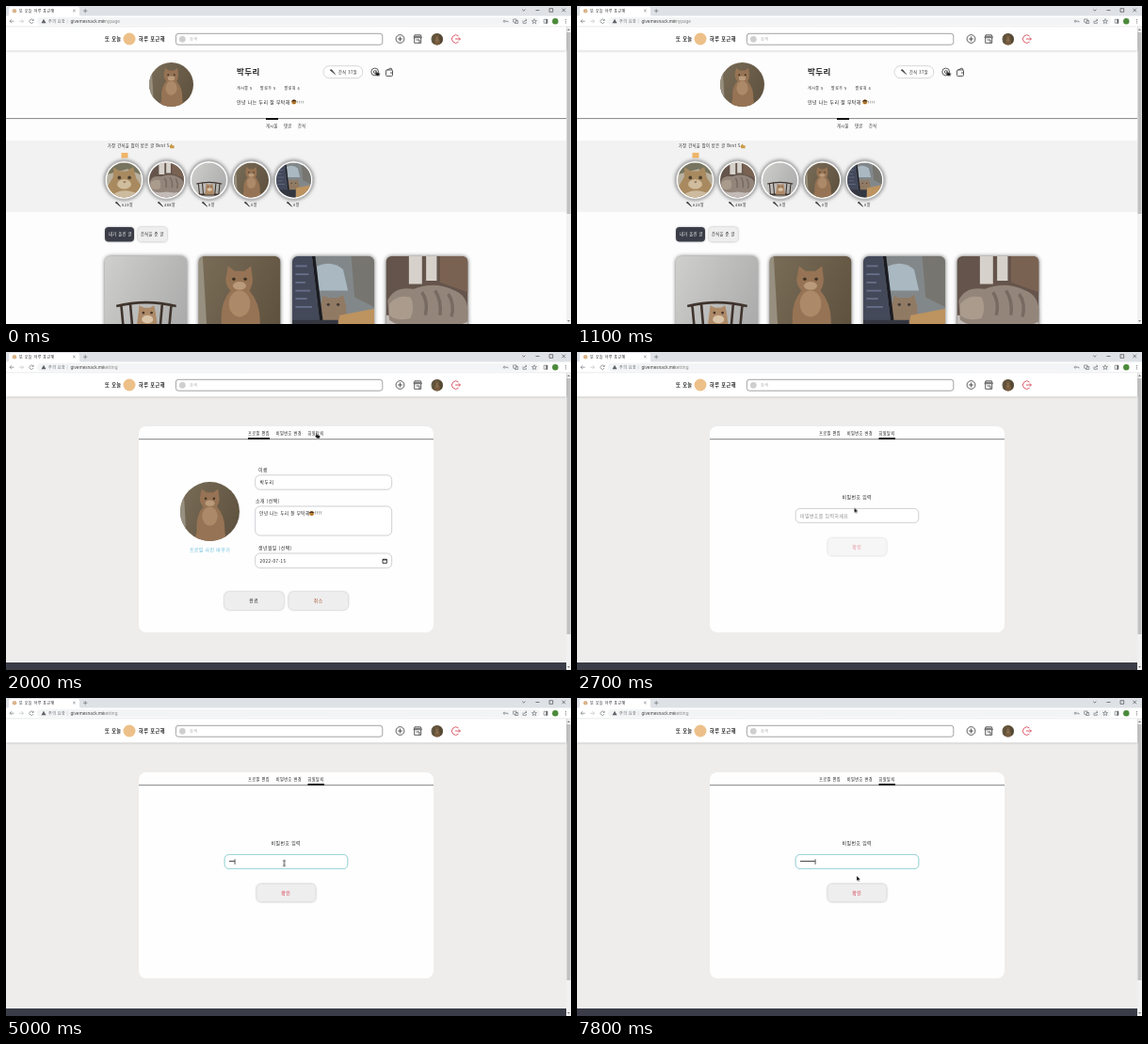
An HTML page for the animation above (8 s loop, 600 px wide and 338 px high).

```html
<!DOCTYPE html>
<html lang="ko">
<head>
<meta charset="utf-8">
<title>또 오늘 하루 포근해</title>
<style>
html, body { margin: 0; width: 100%; height: 100%; overflow: hidden; background: #fff; }
svg { display: block; width: 600px; height: 338px; }
text { font: 4.2px "Noto Sans CJK KR", "Noto Sans CJK", "Noto Sans", sans-serif; letter-spacing: .45px; fill: #222; }
.small { font-size: 4px; }
.large { font-size: 4.9px; }
.url { font: 4.6px "Noto Sans", sans-serif; letter-spacing: 0; fill: #444; }
.mid { text-anchor: middle; }
.bold { font-weight: 700; }
.name { font-size: 8.5px; }
.logo { font-size: 5.2px; }
.grey { fill: #8a8a8a; }
.line { fill: none; stroke: #333; stroke-width: .8; }
.thin { fill: none; stroke: #5f6368; stroke-width: .6; }
.field { fill: #fff; stroke: #c3c5ca; stroke-width: .8; }
.btn { fill: #efeeee; filter: drop-shadow(0 .8px .8px #0005); }
.dark { fill: #3a3d47; }
.card { filter: drop-shadow(0 .5px 2px #0009); }
.track { fill: #f1f1f1; }
.thumb { fill: #c1c1c1; }

/* 1% of the loop is 80 ms */
.profile, .settings, .edit, .leave, .hint, .focus, .ready, .cover, .caret, .blink,
.hand, .arrow, .beam { animation: 8s step-end infinite; }
.profile { animation-name: profile; }
.settings { animation-name: settings; }
.edit { animation-name: edit; }
.leave { animation-name: leave; }
.hint { animation-name: hint; }
.focus { animation-name: focus; }
.ready { animation-name: ready; }
.cover, .caret { animation-name: type; }
.blink { animation-name: blink; }
.hand { animation-name: hand; }
.arrow { animation-name: arrow; }
.beam { animation-name: beam; }
.cursor { animation: move 8s linear infinite; }

@keyframes profile { 0% { opacity: 1 } 15%, 100% { opacity: 0 } }
@keyframes settings { 0% { opacity: 0 } 15%, 100% { opacity: 1 } }
@keyframes edit { 0% { opacity: 1 } 27.5%, 100% { opacity: 0 } }
@keyframes leave { 0% { opacity: 0 } 27.5%, 100% { opacity: 1 } }
@keyframes hint { 0% { opacity: 1 } 50%, 100% { opacity: 0 } }
@keyframes focus { 0% { opacity: 0 } 47.5%, 100% { opacity: 1 } }
@keyframes ready { 0% { opacity: .55 } 50%, 100% { opacity: 1 } }
@keyframes type {
  0% { transform: none }
  50% { transform: translateX(2px) }
  55% { transform: translateX(4px) }
  58.75% { transform: translateX(6px) }
  63.75% { transform: translateX(8px) }
  66.25% { transform: translateX(10px) }
  73.75% { transform: translateX(12px) }
  76.25% { transform: translateX(14px) }
  81.25%, 100% { transform: translateX(16px) }
}
@keyframes blink {
  0% { opacity: 0 } 47.5% { opacity: 1 }
  72.5% { opacity: 0 } 73.75% { opacity: 1 }
  87.5% { opacity: 0 } 93.75%, 100% { opacity: 1 }
}
@keyframes hand { 0% { opacity: 1 } 15% { opacity: 0 } 25% { opacity: 1 } 28.75%, 100% { opacity: 0 } }
@keyframes arrow {
  0% { opacity: 0 } 15% { opacity: 1 } 25% { opacity: 0 } 28.75% { opacity: 1 }
  36.25% { opacity: 0 } 95%, 100% { opacity: 1 }
}
@keyframes beam { 0% { opacity: 0 } 36.25% { opacity: 1 } 95%, 100% { opacity: 0 } }
@keyframes move {
  0% { transform: translate(392.5px, 68.5px) }
  20% { transform: translate(392.5px, 68.5px); animation-timing-function: steps(5, start) }
  26.25% { transform: translate(329px, 86px) }
  27.5% { transform: translate(329px, 86px); animation-timing-function: steps(6, start) }
  35% { transform: translate(294.5px, 165.5px) }
  36.25% { transform: translate(294.5px, 165.5px); animation-timing-function: steps(4, start) }
  41.25% { transform: translate(295.5px, 175.5px) }
  91.25% { transform: translate(295.5px, 175.5px); animation-timing-function: steps(3, start) }
  95% { transform: translate(303px, 179px); animation-timing-function: steps(3, start) }
  98.75%, 100% { transform: translate(297px, 189px) }
}
</style>
</head>
<body>
<svg viewBox="0 0 600 338">
<defs>
  <linearGradient id="wall" x2="1" y2=".6"><stop stop-color="#cfcfcd"/><stop offset="1" stop-color="#abacab"/></linearGradient>
  <linearGradient id="floor" x2="1" y2=".6"><stop stop-color="#796d58"/><stop offset="1" stop-color="#5f523f"/></linearGradient>
  <clipPath id="round"><circle cx="50" cy="50" r="50"/></clipPath>
  <clipPath id="rect"><rect width="100" height="120" rx="7"/></clipPath>

  <!-- photos drawn on a 100 by 120 field -->
  <g id="face">
    <rect width="100" height="120" fill="#b9b1a0"/>
    <path d="M0 0H100V36L60 18 0 34Z" fill="#77755f"/>
    <path d="M18 42L20 14 38 24H58L76 12 84 44 100 68V120H0V72Z" fill="#a98a60"/>
    <ellipse cx="50" cy="62" rx="20" ry="14" fill="#d0bd9d"/>
    <path d="M16 92Q50 70 90 90V120H16Z" fill="#cdbb9f"/>
    <circle cx="36" cy="43" r="5" fill="#4c4030"/><circle cx="65" cy="43" r="5" fill="#4c4030"/>
    <path d="M46 54H56L51 59Z" fill="#7c5947"/>
  </g>
  <g id="nap">
    <rect width="100" height="120" fill="#64544b"/>
    <path d="M28 0H44V34H28ZM49 0H62V30H49Z" fill="#d6d2cb"/><path d="M66 0H100V44L66 32Z" fill="#7a6252"/>
    <path d="M0 72H100V120H0Z" fill="#c3bbb7"/>
    <path d="M2 54Q10 36 34 40 60 30 84 42 99 48 100 66V80Q80 90 50 84 20 90 4 78Z" fill="#93857a"/>
    <path d="M4 58Q14 46 30 50 36 62 30 76 14 80 4 72Z" fill="#aa9b8d"/>
    <path d="M44 44Q52 56 48 72M60 42Q68 54 66 72M76 46Q84 58 80 74" fill="none" stroke="#776a61" stroke-width="4"/>
  </g>
  <g id="chair">
    <rect width="100" height="120" fill="url(#wall)"/>
    <g fill="none" stroke="#40342d" stroke-width="3">
      <path d="M14 61Q50 52 87 61M20 60L23 92M31 58L34 92M70 58L67 92M81 60L78 92"/>
      <path d="M16 92H85" stroke-width="5"/>
    </g>
    <path d="M41 69L42 60 48 63H55L60 60 62 69 65 92H38Z" fill="#ad8a68"/>
    <ellipse cx="52" cy="77" rx="7" ry="5" fill="#d9c4a8"/>
    <circle cx="47" cy="69" r="1.6" fill="#473427"/><circle cx="57" cy="69" r="1.6" fill="#473427"/>
  </g>
  <g id="sit">
    <rect width="100" height="120" fill="url(#floor)"/>
    <path d="M0 0H5L12 120H0Z" fill="#978f7f"/>
    <path d="M33 28L36 12 44 18H56L64 12 66 28Q66 36 62 42 76 58 75 82L78 104H24L28 82Q26 56 39 42 33 36 33 28Z" fill="#967354"/>
    <ellipse cx="50" cy="58" rx="13" ry="16" fill="#ac8a69"/>
    <ellipse cx="50" cy="36" rx="8" ry="5" fill="#b99b7b"/>
    <circle cx="43" cy="28" r="2" fill="#3c3225"/><circle cx="57" cy="28" r="2" fill="#3c3225"/>
  </g>
  <g id="desk">
    <rect width="100" height="120" fill="#82888a"/>
    <path d="M30 12Q48 4 62 16L68 42H32Z" fill="#a9b8c1"/><path d="M72 0H100V62L76 50Z" fill="#77756f"/>
    <path d="M34 60L38 48 44 51H56L62 47 66 62V82H34Z" fill="#917a64"/>
    <circle cx="44" cy="59" r="1.8" fill="#413a35"/><circle cx="56" cy="59" r="1.8" fill="#413a35"/>
    <path d="M58 72L100 64V120H48Z" fill="#bd935f"/>
    <path d="M0 0H24L34 84H0Z" fill="#44495a"/><path d="M24 0H28L38 84H34Z" fill="#1b1c22"/>
    <path d="M4 12H18M4 22H20M4 32H16M4 42H22M4 52H18M4 62H24" stroke="#67718a" stroke-width="2"/>
    <path d="M0 78H56V120H0Z" fill="#343740"/>
  </g>

  <g id="carrot">
    <path d="M-2.4-1.8L-1-2.4 2.6 2.2Z" fill="#4a4542" stroke="#333" stroke-width=".6"/>
    <path d="M-2-1.8L-3-2.5M-1.5-2.2L-1.8-3" class="line"/>
  </g>
  <circle id="ring" r="20.3" fill="#fff" stroke="#bbb"/>
  <g id="emoji"><circle r="2.5" fill="#d7963b"/><path d="M-3-.5Q0-4.4 3-.5Z" fill="#493026"/><path d="M-1.6 .3H-.5M.5 .3H1.6M-1 1.4H1" stroke="#513018" stroke-width=".6"/></g>
</defs>

<!-- profile page -->
<g class="profile">
  <rect y="22" width="600" height="316" fill="#fdfdfd"/>
  <g transform="translate(152 60) scale(.47)" clip-path="url(#round)"><use href="#sit"/></g>
  <text x="245" y="73.4" class="bold name">박두리</text>
  <rect x="337" y="63.7" width="41.8" height="13" rx="6.5" fill="#fff" stroke="#ccc" stroke-width=".8"/>
  <use href="#carrot" x="347" y="70.3"/>
  <text x="353" y="71.9">간식 37알</text>
  <g class="line"><circle cx="391.7" cy="70" r="3.9"/><circle cx="391.7" cy="70" r="1.4"/>
    <rect x="403.5" y="68" width="7" height="6.5" rx="1"/><path d="M404.5 68L409 66 410 68M408 71H410.5"/></g>
  <text x="245" y="88.7" class="small">게시물 5</text><text x="270" y="88.7" class="small">팔로우 5</text><text x="295.5" y="88.7" class="small">팔로워 4</text>
  <text x="245" y="103.8" class="large">안녕 나는 두리 잘 부탁해</text>
  <use href="#emoji" x="305.8" y="102"/>
  <text x="309" y="103.8">!!!!</text>
  <path d="M0 119.6H595" stroke="#757b7b" stroke-width=".9"/>
  <rect x="276" y="119" width="13" height="2" fill="#111"/>
  <text x="276" y="128.7">게시물</text><text x="295" y="128.7">댓글</text><text x="310" y="128.7">간식</text>

  <rect y="143" width="595" height="76" fill="#f2f2f2"/>
  <text x="108" y="150">가장 간식을 많이 받은 글 Best 5</text>
  <path d="M173.5 149L176 146.3 176.5 148.2H178.6V151.2H174.5Z" fill="#c99a45"/>
  <rect x="122.5" y="156" width="7" height="5.5" fill="#f0b568"/>
  <g class="card">
    <use href="#ring" x="125.5" y="185"/><use href="#ring" x="170.5" y="185"/><use href="#ring" x="215.5" y="185"/>
    <use href="#ring" x="260.5" y="185"/><use href="#ring" x="305.5" y="185"/>
  </g>
  <g transform="translate(107 166.5) scale(.37)" clip-path="url(#round)"><use href="#face"/></g>
  <g transform="translate(152 166.5) scale(.37)" clip-path="url(#round)"><use href="#nap"/></g>
  <g transform="translate(197 166.5) scale(.37)" clip-path="url(#round)"><use href="#chair"/></g>
  <g transform="translate(242 166.5) scale(.37)" clip-path="url(#round)"><use href="#sit"/></g>
  <g transform="translate(287 166.5) scale(.37)" clip-path="url(#round)"><use href="#desk"/></g>
  <use href="#carrot" x="119" y="211"/><text x="123" y="212.6" class="small">623알</text>
  <use href="#carrot" x="164" y="211"/><text x="168" y="212.6" class="small">488알</text>
  <use href="#carrot" x="211" y="211"/><text x="215" y="212.6" class="small">0알</text>
  <use href="#carrot" x="256" y="211"/><text x="260" y="212.6" class="small">0알</text>
  <use href="#carrot" x="301" y="211"/><text x="305" y="212.6" class="small">0알</text>

  <rect x="105" y="235" width="31" height="15.5" rx="4" class="btn dark"/>
  <rect x="140" y="235" width="31" height="15.5" rx="4" class="btn"/>
  <text x="109" y="244.4" style="fill:#fff">내가 올린 글</text><text x="143" y="244.4">간식을 준 글</text>

  <g class="card"><g transform="translate(105 266) scale(.87)" clip-path="url(#rect)"><use href="#chair"/></g></g>
  <g class="card"><g transform="translate(204.5 266) scale(.87)" clip-path="url(#rect)"><use href="#sit"/></g></g>
  <g class="card"><g transform="translate(304 266) scale(.87)" clip-path="url(#rect)"><use href="#desk"/></g></g>
  <g class="card"><g transform="translate(403.5 266) scale(.87)" clip-path="url(#rect)"><use href="#nap"/></g></g>
  <rect x="595" y="22" width="5" height="316" class="track"/>
  <rect x="595.5" y="28" width="4" height="193" class="thumb"/>
</g>

<!-- settings page -->
<g class="settings">
  <rect y="22" width="600" height="316" fill="#eeedec"/>
  <rect y="330" width="595" height="8" class="dark"/>
  <rect x="141" y="79" width="313" height="219" rx="8" fill="#fefefe"/>
  <path d="M141 92.7H454" stroke="#75777b" stroke-width=".9"/>
  <text x="257" y="87.5">프로필 편집</text><text x="286.7" y="87.5">비밀번호 변경</text><text x="320.5" y="87.5">회원탈퇴</text>

  <g class="edit">
    <rect x="257" y="91" width="23" height="1.9" fill="#111"/>
    <g transform="translate(185 138) scale(.63)" clip-path="url(#round)"><use href="#sit"/></g>
    <text x="216.5" y="211.6" class="large mid" style="fill:#62bbdc">프로필 사진 바꾸기</text>
    <text x="268" y="126.7" class="large">이름</text>
    <rect x="264.7" y="130.8" width="145" height="15.4" rx="5" class="field"/>
    <text x="269.5" y="140.2" class="large">박두리</text>
    <text x="265" y="159.8" class="large">소개 (선택)</text>
    <rect x="264.7" y="164" width="145" height="31" rx="5" class="field"/>
    <text x="269" y="173.2" style="font-size:4.6px">안녕 나는 두리 잘 부탁해</text>
    <use href="#emoji" x="324.6" y="171.6"/>
    <text x="327.6" y="173.2" class="large">!!!!</text>
    <text x="268" y="210" class="large">생년월일 (선택)</text>
    <rect x="264.7" y="214" width="145" height="15.6" rx="5" class="field"/>
    <text x="269.5" y="223.8" style="font-size:4.6px">2022-07-15</text>
    <path d="M400 220.3H404.4V224.4H400ZM400 221H404.4" fill="none" stroke="#111" stroke-width=".8"/>
    <rect x="232" y="255" width="63" height="19" rx="5" class="btn"/>
    <rect x="300.3" y="255" width="63" height="19" rx="5" class="btn"/>
    <text x="263.3" y="266.2" class="large mid">완료</text>
    <text x="331.8" y="266.2" class="large mid" style="fill:#a0522d">취소</text>
  </g>

  <g class="leave">
    <rect x="320.5" y="91" width="17.5" height="1.9" fill="#111"/>
    <text x="297.3" y="155.8" class="large mid">비밀번호 입력</text>
    <rect x="232.2" y="166.4" width="130.6" height="15.2" rx="4.7" class="field"/>
    <rect x="232.2" y="166.4" width="130.6" height="15.2" rx="4.7" class="field focus" style="stroke:#83d0d2"/>
    <path d="M238 173.6H252.1" stroke="#000" stroke-width="1.5" stroke-linecap="round" stroke-dasharray="0 2"/>
    <rect x="236.8" y="171" width="18" height="6" fill="#fff" class="cover"/>
    <g class="blink"><rect x="236.7" y="171.3" width=".7" height="5.6" fill="#111" class="caret"/></g>
    <text x="237" y="175.5" class="large grey hint">비밀번호를 입력하세요</text>
    <g class="ready">
      <rect x="266.2" y="197.8" width="62.6" height="18.8" rx="5" class="btn"/>
      <text x="297.3" y="208.9" class="large mid" style="fill:#d22f42">확인</text>
    </g>
  </g>
  <rect x="595" y="22" width="5" height="316" class="track"/>
  <rect x="595.5" y="28" width="4" height="272" class="thumb"/>
</g>

<!-- site header -->
<rect y="22" width="595" height="25.5" fill="#fff" style="filter:drop-shadow(0 .6px 1px #0005)"/>
<text x="105" y="37" class="bold logo">또 오늘</text>
<circle cx="131" cy="35" r="6.5" fill="#edc08a"/>
<text x="141" y="37" class="bold logo">하루 포근해</text>
<rect x="180.4" y="29.3" width="219.4" height="11.9" rx="2.7" fill="#fff" stroke="#8c8c8c" stroke-width=".8"/>
<circle cx="187.3" cy="35.3" r="3.4" fill="#cfcfcf"/>
<text x="195" y="36.8" class="small" style="fill:#aaa">검색</text>
<g class="line">
  <circle cx="418.5" cy="35" r="4.4"/><path d="M416 35H421M418.5 32.5V37.5"/>
  <path d="M433.7 34V39.3H440.7V34M433 33.7L434 30.8H440.4L441.4 33.7ZM435.5 36H439V39.3M434 32.3H440.5"/>
  <path d="M480.5 32A4.2 4.2 0 1 0 480.5 38.2M477 35H482.4M480.8 33.4L482.4 35 480.8 36.6" style="stroke:#d63547"/>
</g>
<g transform="translate(451.5 29) scale(.125)" clip-path="url(#round)"><use href="#sit"/><rect width="100" height="100" fill="#3a3014" opacity=".35"/></g>

<!-- browser frame -->
<rect width="600" height="11" fill="#dee1e6"/>
<path d="M1 11Q3 11 3 9V3Q3 1 5 1H76Q78 1 78 3V9Q78 11 80 11Z" fill="#fff"/>
<rect y="10.5" width="600" height="11.5" fill="#fff"/>
<rect x="33" y="12" width="534" height="8.6" rx="4.3" fill="#f3f4f5"/>
<path d="M0 21.8H600" stroke="#dcdee1" stroke-width=".6"/>
<circle cx="9" cy="5.2" r="2.3" fill="#d9b48a"/>
<text x="14" y="6.6" class="small">또 오늘 하루 포근해</text>
<g class="thin">
  <path d="M71.2 3.8L73.6 6.2M73.6 3.8L71.2 6.2M82 5.2H86.4M84.2 3V7.4"/>
  <path d="M548.2 3.6L549.8 5.2 551.4 3.6M562.5 4.5H566.5M577 2.7H580.7V6.3H577ZM590.5 2.7L594 6.2M594 2.7L590.5 6.2" stroke="#333"/>
  <path d="M8.5 16.2H4M6 14.2L4 16.2 6 18.2"/>
  <path d="M14 16.2H18.5M16.5 14.2L18.5 16.2 16.5 18.2" stroke="#b5b7ba"/>
  <path d="M28.9 15.2A2.1 2.1 0 1 0 29 17M29.2 13.8V15.4H27.6"/>
  <circle cx="529.2" cy="16.2" r="1"/><path d="M530.2 16.2H533V17.4"/>
  <path d="M538.7 14H542V17.2H538.7ZM541 15.5H543.7V18.5H540.5V17.2M549 15.5V18.3H552.4V17M550 17Q550.2 15 553 15M551.6 13.7L553 15 551.6 16.3"/>
  <path d="M561 13.7L561.7 15.5 563.5 15.6 562.1 16.8 562.6 18.5 561 17.5 559.4 18.5 559.9 16.8 558.5 15.6 560.3 15.5Z"/>
  <path d="M571.2 14.2H575V18.2H571.2Z"/><path d="M574.2 14V18.4" stroke-width="1.6"/>
</g>
<path d="M37.5 18.3L40 13.8 42.5 18.3Z" fill="#5f6368"/>
<circle cx="583.3" cy="16.2" r="3.2" fill="#4b8b3b"/>
<path d="M594.5 14.4V18.2" stroke="#5f6368" stroke-linecap="round" stroke-dasharray="0 1.8"/>
<text x="45" y="17.8" class="small" style="fill:#5f6368">주의 요함</text>
<path d="M65.2 14V18.5" stroke="#c5c7ca" stroke-width=".5"/>
<text x="68.5" y="17.9" class="url">givemesnack.me</text>
<text x="101.8" y="17.9" class="url grey profile">/mypage</text>
<text x="101.8" y="17.9" class="url grey settings">/setting</text>
<path d="M596 26L597.5 24.2 599 26ZM596 334L597.5 335.8 599 334Z" fill="#777"/>

<!-- pointer -->
<g class="cursor">
  <path class="arrow" d="M0 0V5.4L1.3 4.3 2.1 6.1 3 5.7 2.2 4H3.9Z" fill="#000" stroke="#fff" stroke-width=".3"/>
  <path class="hand" d="M.1 .2Q.7-.4 1.2 .3V2L4 2.7Q4.7 3 4.5 4L4 5.8H1.2L-1 3.5Q-.8 2.5 .1 3.3Z" fill="#111" stroke="#fff" stroke-width=".3"/>
  <path class="beam" d="M-1.3-2.6H1.3M0-2.6V2.9M-1.3 2.9H1.3" fill="none" stroke="#111" stroke-width=".8"/>
</g>
</svg>
</body>
</html>
```
